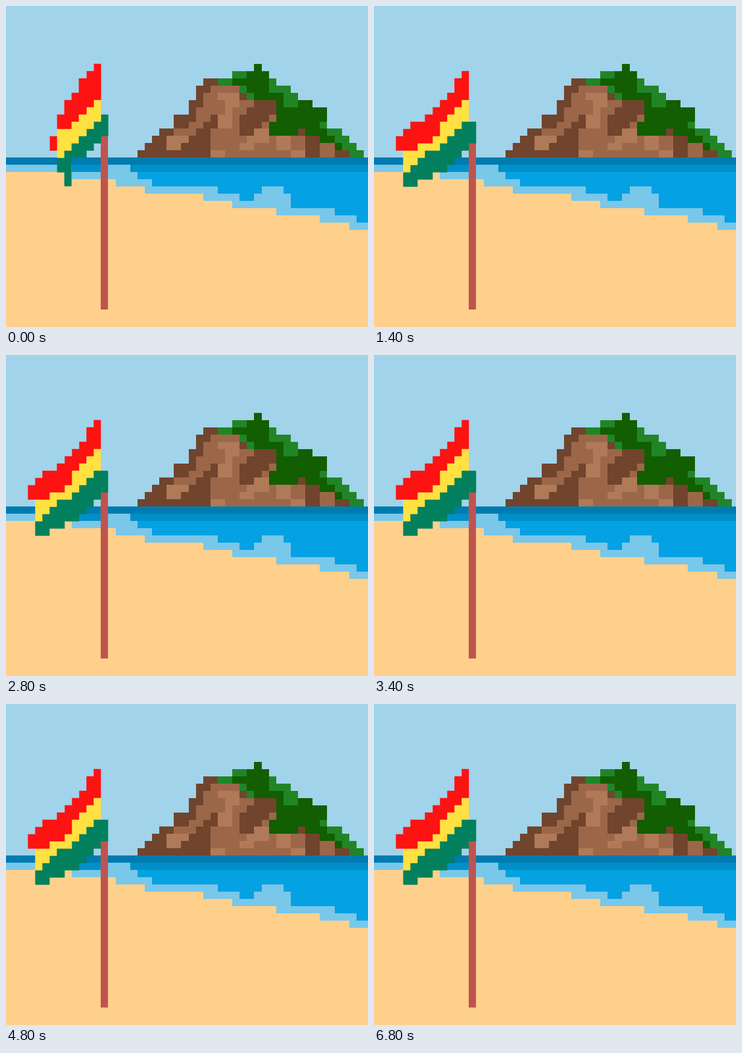
Animation of 600x532 px, one loop 6.9 s. Source, as an HTML page:

```html
<!DOCTYPE html>
<html lang="en">
<head>
<meta charset="utf-8">
<title>Beach flag</title>
<style>
  html, body { margin: 0; width: 100%; height: 100%; overflow: hidden; background: #a1d3ea; }
  svg { display: block; width: 600px; height: 532px; }
</style>
</head>
<body>
<svg id="stage" viewBox="0 0 600 532" shape-rendering="crispEdges"></svg>
<script>
const LOOP = 6900, FIRST_FLIP = 400, FLIP = 500;
const CELL = { x: 12.1, y: 11.97 };

const svgNode = (name, attrs, parent) => {
  const node = document.createElementNS('http://www.w3.org/2000/svg', name);
  for (const key in attrs) node.setAttribute(key, attrs[key]);
  return parent.appendChild(node);
};
const paint = (parent, shapes) =>
  shapes.forEach(([fill, d]) => svgNode('path', { fill, d }, parent));

const stage = document.getElementById('stage');
const grid = svgNode('g', { transform: `scale(${CELL.x} ${CELL.y})` }, stage);

// Paths are in grid cells: H is a column, V is a row.
const beach = [
  ['#ffd08b', 'M0 22H50V45H0Z'],
  ['#79c7e9', 'M0 22H50V31H47V30H43V29H37V28H31V27H27V26H19V25H15V24H9V23H0Z'],
  ['#04a1e3', 'M17 22H50V30H48V29H45V28H39V26H38V25H35V26H34V27H32V26H29V25H20V24H18V23H17Z'],
  ['#008fc8', 'M9 22H13V23H9ZM17 22H50V23H17Z'],
  ['#007baf', 'M0 21H50V22H0Z']
];

const hill = [
  ['#70442d', 'M27 10H29V11H34V13H37V17H41V18H43V19H45V20H47V21H18V20H19V19H20V18H21V17H23V15H25V13H26V11H27Z'],
  ['#9c6749', 'M28 11H32V13H34V14H33V15H32V18H34V17H35V16H36V15H37V18H41V21H28V20H22V18H23V17H25V16H26V14H27V12H28ZM43 19H45V21H43Z'],
  ['#70442d', 'M28 15H29V17H28V20H24V19H25V18H26V17H27V16H28Z'],
  ['#b07958', 'M29 12H32V14H31V17H29V15H30V13H29ZM22 18H25V19H24V20H22ZM28 20H30V21H28ZM34 17H36V19H34V20H32V19H33V18H34ZM37 18H39V20H41V21H39V20H37Z'],
  ['#218526', 'M34 8H35V9H36V10H37V11H39V12H40V13H42V14H44V17H46V18H47V19H48V20H49V21H47V20H45V19H43V18H41V17H40V18H36V16H37V13H33V12H32V11H29V10H31V9H34Z'],
  ['#125e00', 'M34 8H35V9H36V12H38V14H40V13H42V14H44V16H43V17H44V18H45V19H46V20H45V19H43V18H41V17H40V18H36V16H37V13H34V12H33V11H31V10H33V9H34Z']
];

const pole = [['#bf544f', 'M13 18H14V42H13Z']];

const RED = '#ff1212', YELLOW = '#ffe141', GREEN = '#02805d';
const drooping = [
  [RED, 'M12 8H13V13H12V14H11V15H10V16H9V17H7V15H8V13H9V12H10V10H11V9H12ZM6 18H7V20H6Z'],
  [YELLOW, 'M12 13H13V16H12V17H11V18H10V19H9V20H8V21H7V17H9V16H10V15H11V14H12Z'],
  [GREEN, 'M13 15H14V18H13V19H12V20H11V21H9V25H8V23H7V21H8V20H9V19H10V18H11V17H12V16H13Z']
];
const spread = [
  [RED, 'M12 9H13V13H12V14H11V15H10V16H9V18H8V19H6V20H3V18H4V17H5V16H7V15H8V14H9V13H10V12H11V10H12Z'],
  [YELLOW, 'M12 13H13V16H12V17H11V18H10V19H9V20H7V21H6V22H5V23H4V20H6V19H8V18H9V16H10V15H11V14H12Z'],
  [GREEN, 'M12 16H14V19H13V20H12V21H11V22H10V23H8V24H6V25H4V23H5V22H6V21H7V20H9V19H10V18H11V17H12Z']
];

[beach, hill, pole].forEach(shapes => paint(grid, shapes));

// The two poses swap on a hard beat; the first one is cut short by the loop.
const flips = [0];
for (let t = FIRST_FLIP; t < LOOP; t += FLIP) flips.push(t);

[drooping, spread].forEach((shapes, pose) => {
  const flag = svgNode('g', {}, grid);
  paint(flag, shapes);
  const steps = flips.map((t, i) => ({
    offset: t / LOOP,
    opacity: i % 2 === pose ? 1 : 0,
    easing: 'steps(1, end)'
  }));
  steps.push({ offset: 1, opacity: steps[steps.length - 1].opacity });
  flag.animate(steps, { duration: LOOP, iterations: Infinity });
});
</script>
</body>
</html>
```
